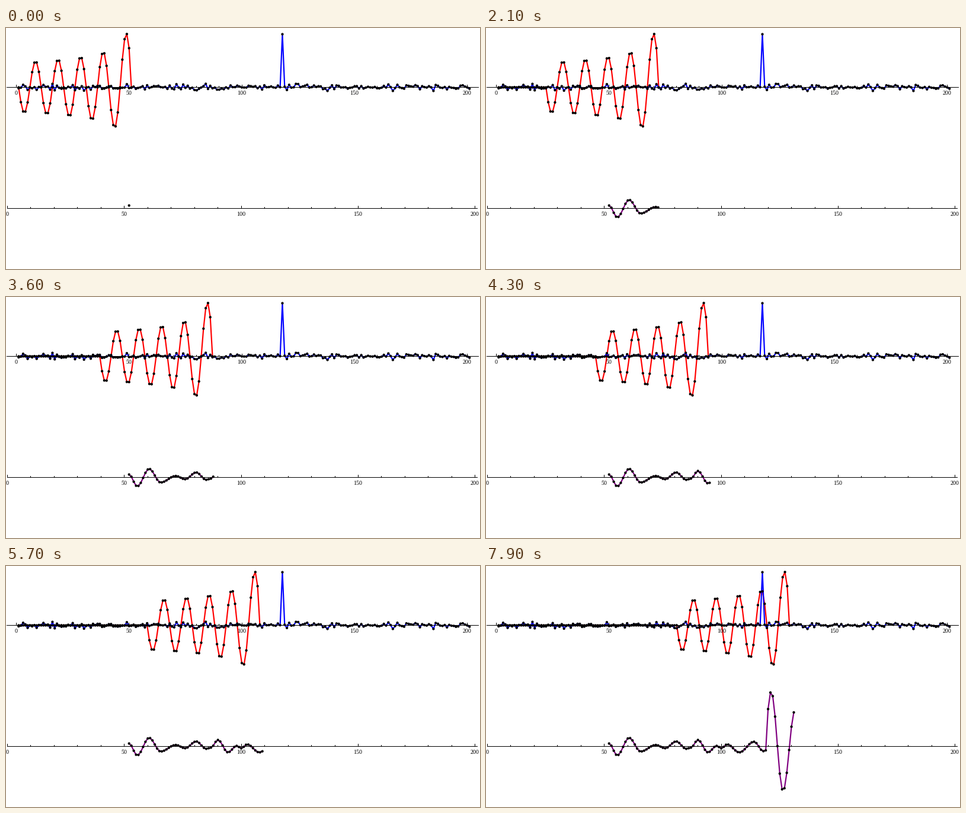
Write a matplotlib script that moves like this. It is 800x408 px and loops after 8000 ms.

```python
import numpy as np
import matplotlib.pyplot as plt
from matplotlib.animation import FuncAnimation
from matplotlib.collections import LineCollection

W, H, DPI = 800, 408, 100
PX = 72 / DPI
FRAMES = 80
SPIKE = 118

plt.rcParams["font.family"] = "Liberation Serif"
fig = plt.figure(figsize=(W / DPI, H / DPI), dpi=DPI, facecolor="white")
ax = fig.add_axes([0, 0, 1, 1])
ax.set_xlim(0, W)
ax.set_ylim(H, 0)
ax.axis("off")


class Curve:
    """A coloured line with a round black dot on every sample."""

    def __init__(self, track, color, z):
        self.track = track
        self.line, = ax.plot([], [], color=color, lw=2.2 * PX, zorder=z)
        # Very short round-capped strokes keep dots at sub-pixel positions.
        self.dots = LineCollection([], colors="black", linewidths=4.4 * PX,
                                   capstyle="round", zorder=3)
        self.dots.set_snap(False)
        ax.add_collection(self.dots, autolim=False)

    def put(self, n, height):
        x = self.track.x0 + self.track.step * n
        y = self.track.y0 - height
        self.line.set_data(x, y)
        self.dots.set_segments([[(a, b), (a + 0.01, b)] for a, b in zip(x, y)])


class Track:
    """A ruled horizontal axis: sample number -> x, height -> y."""

    def __init__(self, x0, step, y0, left, right):
        self.x0, self.step, self.y0 = x0, step, y0
        self.rule([left, right], [y0, y0])
        for n in range(0, 201, 10):
            x = np.floor(x0 + step * n)
            major = n % 50 == 0
            self.rule([x + 0.5] * 2, [y0, y0 - (4.5 if major else 2.5)])
            if major:
                ax.text(x, y0 + 12.5, str(n), size=10 * PX, ha="center",
                        va="baseline", zorder=5)

    def rule(self, xs, ys):
        ax.plot(xs, ys, color="black", lw=PX, solid_capstyle="butt",
                snap=False, zorder=4)


def chirp():
    """Inspiral wave: amplitude grows as (time left) ** -1/4."""
    m = np.arange(51)
    left = np.maximum(50 - m, 1)
    return -112.9 * left ** -0.25 * np.sin(2 * np.pi * m / 10)


def noisy_spike(n):
    noise = np.random.default_rng(4).normal(0, 2.6, len(n)).clip(-6, 6)
    return np.where(n == SPIKE, 90, noise)


def ease_through(points, n):
    """Cosine-eased curve through turning points (sample, height)."""
    xs, ys = np.transpose(points)
    k = np.clip(np.searchsorted(xs, n, side="right") - 1, 0, len(xs) - 2)
    t = (n - xs[k]) / (xs[k + 1] - xs[k])
    return ys[k] + (ys[k + 1] - ys[k]) * (1 - np.cos(np.pi * t)) / 2


def filtered(n, template):
    """Slow noise drift plus the spike's echo: the template reversed."""
    drift = ease_through([
        (52, 5), (55.5, -15), (60.6, 14.5), (65.5, -8.5), (72, 2.5),
        (76, -3), (80.7, 8.5), (85, -4), (87, -2), (90, 11), (94.3, -10),
        (98, 1), (100, -3), (102.5, 3.5), (107.7, -10), (114, 8),
        (118, -8), (122.5, 4), (126.5, -7), (129, -6), (131, 0)], n)
    lag = n - SPIKE - 1
    echo = np.where(lag >= 0, template[::-1][np.maximum(lag, 0)], 0)
    return drift + echo


top = Track(17.5, 3.805, 100.5, 1, 798)
bottom = Track(2.5, 3.9465, 305.5, 2, 796)

template = chirp()
samples = np.arange(1, 202)
out_n = 52 + np.arange(FRAMES)
output = filtered(out_n, template)

red = Curve(top, "red", 1)
blue = Curve(top, "blue", 2)
purple = Curve(bottom, "purple", 1)
blue.put(samples, noisy_spike(samples))


def update(i):
    wave = np.concatenate([np.zeros(i), template])
    red.put(samples[:len(wave)], wave)
    purple.put(out_n[:i + 1], output[:i + 1])
    return red.line, red.dots, purple.line, purple.dots


anim = FuncAnimation(fig, update, frames=FRAMES, interval=100,
                     init_func=lambda: update(0), repeat=True, repeat_delay=0)
plt.show()
```
